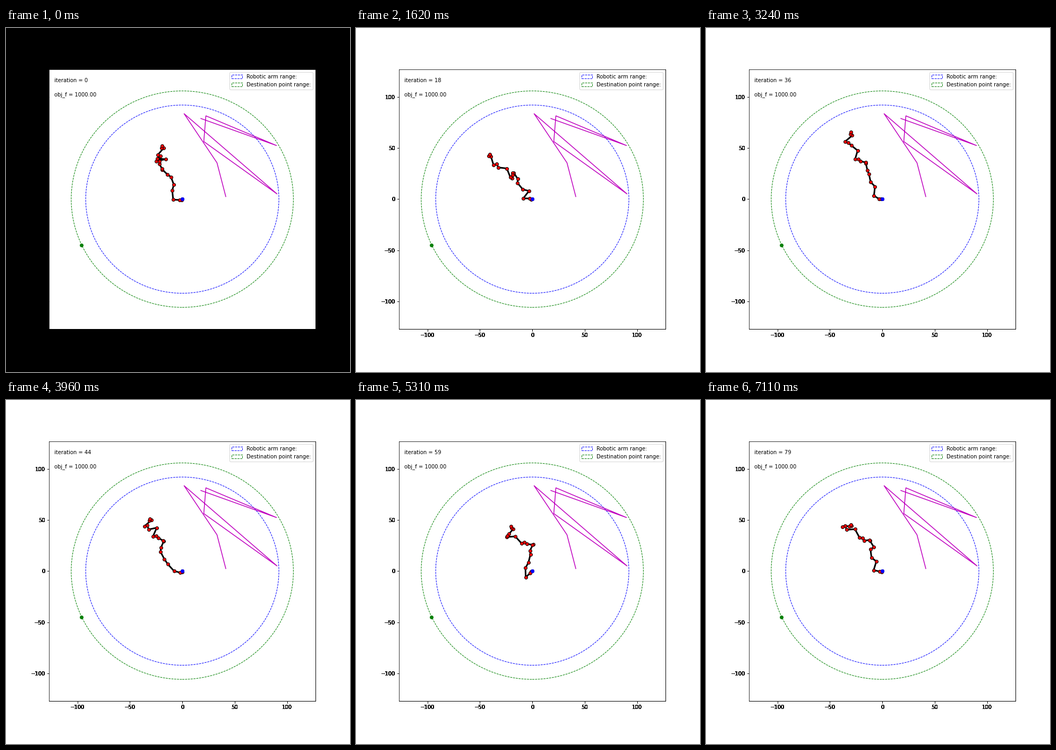
Recreate the animation shown at these times as a matplotlib script. Size 648x648 px, loop 7.2 s.

```python
import matplotlib.pyplot as plt
import numpy as np
from matplotlib.animation import FuncAnimation

plt.rcParams["font.family"] = "DejaVu Sans"

FRAMES, STEP_MS = 80, 90
DEST_R = 106
ARM_R = DEST_R / 1.15
LIMIT = 1.2 * DEST_R

LINKS = np.array([1, 2, 6, 9, 6, 8, 4, 7, 1, 5, 3, 3, 9, 8, 4, 3, 9, 2, 2])
OBSTACLE = [(17.7, 79.0), (89.9, 52.5), (22.5, 81.6), (20.5, 56.4),
            (90.4, 5.1), (1.7, 83.7), (33.1, 35.6), (41.5, 2.5)]


def joints(i):
    """Arm pose: rises from the origin, zigzags near the tip, jitters at random."""
    k = np.arange(1, len(LINKS) + 1)
    heading = np.interp(k, [1, 3, 4, 8, 9, 19], [220, 155, 92, 102, 145, 125])
    swing = np.interp(k, [8, 12, 17], [0, 40, 60])
    jitter = np.random.default_rng(i).normal(0, 35, len(k))
    a = np.radians(heading + swing * (-1.0) ** k + jitter)
    x = np.cumsum(LINKS * np.cos(a))
    y = np.cumsum(LINKS * np.sin(a))
    return np.r_[0, x], np.r_[0, y]


def set_limits(axes):
    axes.set_xlim(-LIMIT, LIMIT)
    axes.set_ylim(-LIMIT, LIMIT)


fig, ax = plt.subplots(figsize=(9, 9), dpi=72)
fig.subplots_adjust(left=0.125, right=0.9, bottom=0.125, top=0.88)
set_limits(ax)

# Stacked copies of the axes make the tick labels heavy and hard-edged.
for n in range(10):
    copy = fig.add_axes(ax.get_position(), label=f"copy{n}", zorder=-1)
    copy.patch.set_visible(False)
    set_limits(copy)

for radius, color, label in ((ARM_R, "b", "Robotic arm range:"),
                             (DEST_R, "g", "Destination point range:")):
    ax.add_patch(plt.Circle((0, 0), radius, fill=False, ec=color,
                            ls="--", lw=1, label=label))
ax.legend(loc="upper right")

ax.plot(*zip(*OBSTACLE), "m-", lw=1.5)
goal = np.radians(205)
ax.plot(DEST_R * np.cos(goal), DEST_R * np.sin(goal), "go", ms=6)
arm, = ax.plot([], [], "k-o", lw=3, ms=6, mfc="r", mec="k", mew=1)
ax.plot(0, 0, "bo", ms=6)
counter = ax.text(-1.15 * DEST_R, 1.08 * DEST_R, "")
ax.text(-1.15 * DEST_R, 0.955 * DEST_R, "obj_f = 1000.00")


def update(i):
    fig.set_facecolor("black" if i == 0 else "white")
    arm.set_data(*joints(i))
    counter.set_text(f"iteration = {i}")
    return arm, counter


anim = FuncAnimation(fig, update, frames=FRAMES, interval=STEP_MS,
                     repeat=True, repeat_delay=0, blit=False)
plt.show()
```
